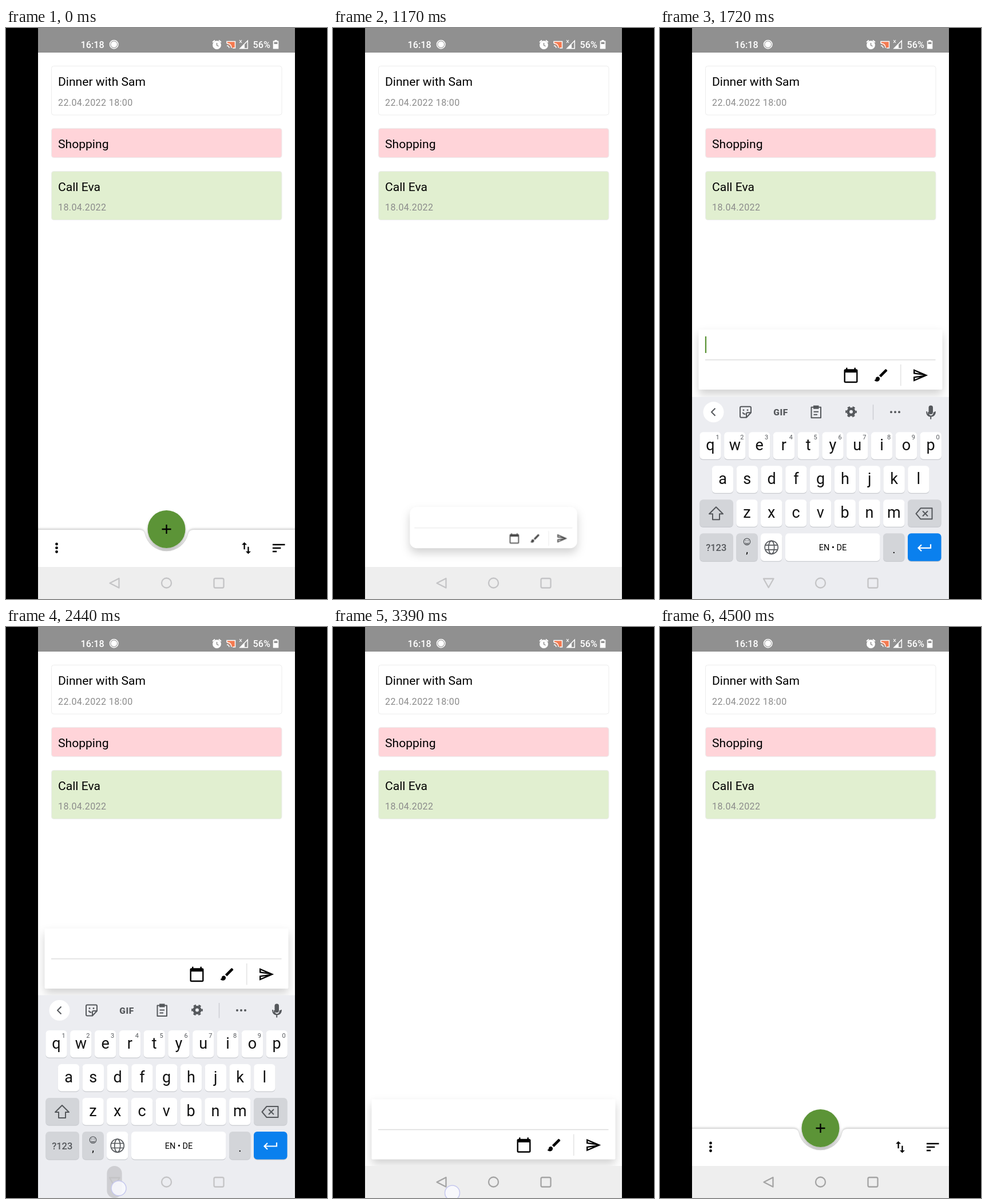
Write an HTML page that moves like this. It is 561 by 998 pixels and loops after 4560 ms.

```html
<!DOCTYPE html>
<html lang="en">
<head>
<meta charset="utf-8">
<title>Task list</title>
<style>
  html, body { margin: 0; width: 100%; height: 100%; overflow: hidden; background: #000; }
  svg { display: block; width: 561px; height: 998px; font-family: Roboto, sans-serif; }
  .title { font-size: 21.1px; }
  .date { font-size: 16px; letter-spacing: .4px; fill: #8b8b8b; }
  .status { font-size: 16.2px; font-weight: 500; fill: #fff; }
  .line { fill: none; stroke: #55585c; stroke-width: 2; stroke-linejoin: round; }
  .letter { font-size: 27px; text-anchor: middle; fill: #111; }
  .hint { font-size: 11px; text-anchor: middle; fill: #55585c; }
  #bar { filter: drop-shadow(0 -1px 2px rgba(0,0,0,.28)); }
</style>
</head>
<body>
<svg viewBox="0 0 561 998">
  <clipPath id="screen"><path d="M56 0H505V998H56Z"/></clipPath>
  <g clip-path="url(#screen)">
    <path d="M56 0H505V998H56Z" fill="#fff"/>
    <g stroke="#ececec">
      <rect x="79.5" y="66.500" width="402.500" height="85.500" rx="4" fill="#fff"/>
      <rect x="79.500" y="175.500" width="402.500" height="51" rx="4" fill="#ffd4d9"/>
      <rect x="79.500" y="250.500" width="402.500" height="85" rx="4" fill="#e1efd0"/>
    </g>
    <text class="title" x="91" y="101">Dinner with Sam</text>
    <text class="date" x="91" y="136">22.04.2022 18:00</text>
    <text class="title" x="91" y="209.500">Shopping</text>
    <text class="title" x="91" y="284.500">Call Eva</text>
    <text class="date" x="91" y="319">18.04.2022</text>

    <g id="bar">
      <path fill="#fff" d="M40 877H233Q241 877 242.500 884A39 39 0 0 0 318.500 884Q320 877 328 877H521V970H40Z"/>
      <circle cx="88.500" cy="902" r="2.400"/><circle cx="88.500" cy="908.700" r="2.400"/><circle cx="88.500" cy="915.500" r="2.400"/>
    </g>

    <g id="sheet">
      <rect class="shape" fill="#fff"/>
      <rect class="shape" id="green" fill="#5c9437"/>
      <path id="plus" d="M-8 0H8M0-8V8" stroke="#000" stroke-width="2.300"/>
      <g id="form">
        <path d="M11.500 53H414" stroke="#dcdcdc" stroke-width="1.500"/>
        <path d="M353.300 61V98.500" stroke="#ddd" stroke-width="1.200"/>
        <rect id="cursor" x="11.300" y="12" width="2.300" height="29" fill="#5c9437"/>
      </g>
    </g>

    <path d="M56 942H505V998H56Z" fill="#eee"/>

    <g id="keyboard">
      <path d="M56 643.500H505V998H56Z" fill="#ecedf1"/>
      <circle cx="93.500" cy="670" r="18" fill="#fff"/>
      <path class="line" d="M96.500 663.500L90 670L96.500 676.500"/>
      <g class="line">
        <path d="M142 660.500H157Q159 660.500 159 662.500V671L151 679.500H142Q140 679.500 140 677.500V662.500Q140 660.500 142 660.500ZM151 679V673Q151 671 153 671H159M144.500 670.500Q146 674 149.500 673.500"/>
        <path d="M264.500 661.500H281V680H264.500ZM268.500 669.500H277M268.500 674.500H275"/>
        <path d="M469 670Q469 677 473.200 677Q478.500 677 479 670M466 669Q466 677 473.200 677.500Q481 677 481 669M473.200 677V682.500"/>
      </g>
      <g fill="#55585c">
        <path d="M268 658.500H277.500V664.500H268Z"/>
        <circle cx="146" cy="666.500" r="1.400"/><circle cx="153" cy="666.500" r="1.400"/>
        <rect x="469.500" y="658.500" width="7.500" height="15.500" rx="3.700"/>
        <circle cx="404" cy="670" r="2"/><circle cx="411" cy="670" r="2"/><circle cx="418" cy="670" r="2"/>
        <text x="211" y="675.500" text-anchor="middle" font-size="15.500" font-weight="900" letter-spacing=".6">GIF</text>
      </g>
      <circle cx="334" cy="669.500" r="5.300" fill="none" stroke="#55585c" stroke-width="4.600"/>
      <circle cx="334" cy="669.500" r="8.600" fill="none" stroke="#55585c" stroke-width="2.600" stroke-dasharray="4.500 4.506" stroke-dashoffset="2.250"/>
      <path d="M372.500 657V683.500" stroke="#c9cbd0" stroke-width="1.300"/>
      <g id="keys"></g>
      <path class="line" d="M98 836L110 848H104V858H92V848H86Z"/>
      <path class="line" d="M455.500 838H475.500V857H455.500L447.500 847.500ZM459 843L468 852M468 843L459 852"/>
      <text x="98.300" y="912.500" text-anchor="middle" font-size="16.500" font-weight="500" fill="#55585c">?123</text>
      <g class="line" stroke-width="1.400">
        <circle cx="152" cy="896.500" r="5.700" stroke-width="1.300"/><path stroke-width="1.300" d="M149 898.500Q152 901.500 155 898.500M150 894V895.500M154 894V895.500"/>
        <circle cx="194.700" cy="906.500" r="11.500" stroke-width="1.700"/>
        <ellipse cx="194.700" cy="906.500" rx="5" ry="11.500" stroke-width="1.700"/>
        <path stroke-width="1.700" d="M184 902.500H205.500M184 910.500H205.500"/>
      </g>
      <text x="152" y="917" text-anchor="middle" font-size="19">,</text>
      <text x="302" y="912" text-anchor="middle" font-size="14.500">EN • DE</text>
      <text x="409" y="917" text-anchor="middle" font-size="20">.</text>
      <path d="M473 901V907.500H452M457 902L451.500 907.500L457 913" fill="none" stroke="#fff" stroke-width="2.200"/>
    </g>

    <rect id="ripple" fill="#000"/>
    <g id="nav" fill="none" stroke-width="2.300" stroke-linejoin="round">
      <path id="back"/>
      <circle cx="280.500" cy="970" r="8.500"/>
      <rect x="363.500" y="962" width="17" height="16.500" rx="2.500"/>
    </g>
    <circle id="touch" r="13" fill="#f8f8fd" fill-opacity=".9" stroke="#c6c8ee" stroke-width="1.500"/>

    <path d="M56 0H505V43H56Z" fill="#909090"/>
    <text class="status" x="130.500" y="34.500">16:18</text>
    <text class="status" x="431.500" y="34.500">56%</text>
    <g fill="none" stroke="#fff" stroke-width="1.500">
      <circle cx="188.700" cy="28.700" r="7.200"/><circle cx="188.700" cy="28.700" r="4.700" fill="#fff"/>
      <circle cx="368.500" cy="29.700" r="6.700" fill="#fff"/>
      <path d="M361 25L365 21.500M372 21.500L376 25" stroke-width="2"/>
      <path d="M368.500 26V30L371.500 32" stroke="#909090"/>
      <path d="M386 27V23.500H400.500V35H396" fill="#f47a50"/>
      <path d="M386 27Q394 27 394 35M386 31Q390 31 390 35" stroke-width="1.400"/>
      <path d="M409 35.700H422.300V22.300Z"/>
      <path d="M409 36L417 28V36Z" fill="#fff" stroke="none"/>
      <path d="M408 21L412 26M412 21L408 26" stroke-width="1.200"/>
      <path d="M469.500 21H473.500V22.500H476.300V36.500H466.700V22.500H469.500Z" fill="#fff" stroke="none"/>
      <path d="M468.500 24.500H474.500V28H468.500Z" fill="#909090" stroke="none"/>
    </g>
  </g>
</svg>
<script>
const LOOP = 4560;
const $ = id => document.getElementById(id);

function add(parent, tag, attrs, text) {
  const el = document.createElementNS('http://www.w3.org/2000/svg', tag);
  set(el, attrs);
  if (text) el.textContent = text;
  parent.append(el);
}
function set(el, attrs) {
  for (const name in attrs) el.setAttribute(name, attrs[name]);
}

// Icons on a 24-unit grid, centred on (x, y).
function icon(parent, d, x, y, scale) {
  add(parent, 'path', { d, transform: `translate(${x} ${y}) scale(${scale}) translate(-12 -12)` });
}
icon($('bar'), 'M16 17V10h-2v7h-3l4 4 4-4zM9 3L5 7h3v7h2V7h3z', 420, 909, 1.14);
icon($('bar'), 'M3 18h6v-2H3zM3 6v2h18V6zM3 13h12v-2H3z', 476.7, 909, 1.2);
icon($('form'), 'M20 3h-1V1h-2v2H7V1H5v2H4c-1.1 0-2 .9-2 2v16c0 1.100.9 2 2 2h16c1.100 0 2-.9 2-2V5c0-1.100-.9-2-2-2zm0 18H4V8h16z', 266, 80, 1.2);
icon($('form'), 'M7 14c-1.660 0-3 1.340-3 3 0 1.310-1.160 2-2 2 .92 1.220 2.490 2 4 2 2.210 0 4-1.790 4-4 0-1.660-1.340-3-3-3zm13.710-9.370l-1.340-1.340c-.39-.39-1.020-.39-1.410 0L9 12.250 11.750 15l8.960-8.960c.39-.39.39-1.020 0-1.410z', 319, 80, 1.2);
icon($('form'), 'M4 6l7.500 3.250-7.500-1zm7.500 8.750L4 18v-2.250zM2 3v7l15 2-15 2v7l21-9z', 387.500, 80, 1.2);

const PITCH = 42.8;
function key(x, y, w, fill = '#fff', h = 47.5) {
  add($('keys'), 'rect', { x, y: y + 1.2, width: w, height: h, rx: 6, fill: '#c9cbd0' });
  add($('keys'), 'rect', { x, y, width: w, height: h, rx: 6, fill });
}
[['qwertyuiop', 88, 705], ['asdfghjkl', 109.5, 764], ['zxcvbnm', 152, 823]].forEach(([row, x0, y], r) => {
  [...row].forEach((ch, i) => {
    const x = x0 + i * PITCH;
    key(x - 18.7, y, 37.4);
    add($('keys'), 'text', { class: 'letter', x, y: y + 31.5 }, ch);
    if (!r) add($('keys'), 'text', { class: 'hint', x: x + 12.5, y: y + 12.5 }, String((i + 1) % 10));
  });
});
const GREY = '#d3d5d9';
key(69.3, 823, 58.5, GREY);
key(433, 823, 58.5, GREY);
[[69.3, 58.5, GREY], [133.3, 37.4, GREY], [176, 37.4, '#fff'], [219, 165.5, '#fff'],
 [390, 37.4, GREY], [433, 58.5, '#0a80ee']].forEach(([x, w, fill]) => key(x, 882, w, fill, 48.5));

const clamp = v => Math.min(1, Math.max(0, v));
const lerp = (a, b, k) => a + (b - a) * k;
const span = (t, from, to) => clamp((t - from) / (to - from));
const within = (t, from, to) => t >= from && t < to;

// cubic-bezier(.4, 0, .2, 1), solved by bisection
function ease(x) {
  let lo = 0, hi = 1, s = .5;
  for (let i = 0; i < 20; i++) {
    s = (lo + hi) / 2;
    if (1.2 * (1 - s) ** 2 * s + .6 * (1 - s) * s * s + s ** 3 < x) lo = s; else hi = s;
  }
  return 3 * (1 - s) * s * s + s ** 3;
}

const KEYS_IN = 1600, KEYS_OUT = 2560, TAP = 2440, TAP_2 = 3390;
const TOUCHES = [[720, 830, 285, 885], [TAP, 2580, 197, 981], [TAP_2, 3500, 208.500, 989]];
const shapes = document.querySelectorAll('.shape');

function drawSheet(t, p, hidden) {
  const lifted = within(t, KEYS_IN - 40, KEYS_OUT);
  const w = lerp(66, 426, p);
  const h = lerp(w, 105 * w / 426, clamp(p / .22));
  const x = 280.5 - w / 2;
  const y = lerp(843 + 14 * hidden, 825.5, p) - (lifted ? 298.5 : 0);
  const k = clamp((p - .1) / .5);
  const corner = 26 * (1 - p) + 2;
  for (const el of shapes) {
    set(el, { x, y, width: w, height: h, rx: lerp(w / 2, corner, k), ry: lerp(h / 2, corner, k) });
  }
  const green = clamp(1 - (p - .04) / .35);
  set($('green'), { opacity: green });
  set($('plus'), { opacity: green, transform: `translate(280.5 ${y + h / 2}) scale(${w / 66})` });
  set($('form'), { opacity: clamp((p - .3) / .45), transform: `translate(${x} ${y}) scale(${w / 426})` });
  set($('cursor'), { opacity: +(within(t, 1560, 2060) || within(t, 2560, 3060)) });
  $('sheet').style.filter =
    `drop-shadow(0 ${lerp(3.5, 8, k)}px ${lerp(2.2, 8, k)}px rgba(0,0,0,${lerp(.27, .18, k)}))`;
}

function draw(t) {
  const hidden = ease(span(t, 830, 1008)) - ease(span(t, 4132, 4400));
  set($('bar'), { transform: `translate(0 ${72 * hidden})` });

  drawSheet(t, ease(span(t, 1008, 1408)) - ease(span(t, 3732, 4132)), hidden);

  const out = span(t, KEYS_OUT, 2720);
  const slide = 35 * ((1 - span(t, KEYS_IN, KEYS_IN + 250)) ** 5 + out * out);
  set($('keyboard'), { opacity: span(t, KEYS_IN, KEYS_IN + 110) - out, transform: `translate(0 ${slide})` });

  set($('back'), { d: within(t, KEYS_IN, KEYS_OUT) ? 'M181 962.500H198.500L189.700 978Z' : 'M197.500 962V978.500L181.500 970.300Z' });
  set($('nav'), { stroke: t < KEYS_OUT ? '#c4c4c6' : '#a4a4a4' });

  const start = t < 2890 ? TAP : TAP_2 + 50;
  const grow = span(t, start, start + 280);
  const rw = lerp(26, 116, grow), rh = lerp(56, 50, grow);
  set($('ripple'), {
    x: 189.5 - rw / 2, y: 970 - rh / 2, width: rw, height: rh, rx: lerp(13, 25, grow),
    opacity: within(t, start, start + 450) ? lerp(.13, .03, grow) : 0
  });

  const tap = TOUCHES.find(([from, to]) => within(t, from, to));
  set($('touch'), tap ? { cx: tap[2], cy: tap[3], opacity: 1 } : { opacity: 0 });
}

const begin = performance.now();
function tick() {
  draw((performance.now() - begin) % LOOP);
  requestAnimationFrame(tick);
}
tick();
</script>
</body>
</html>
```
